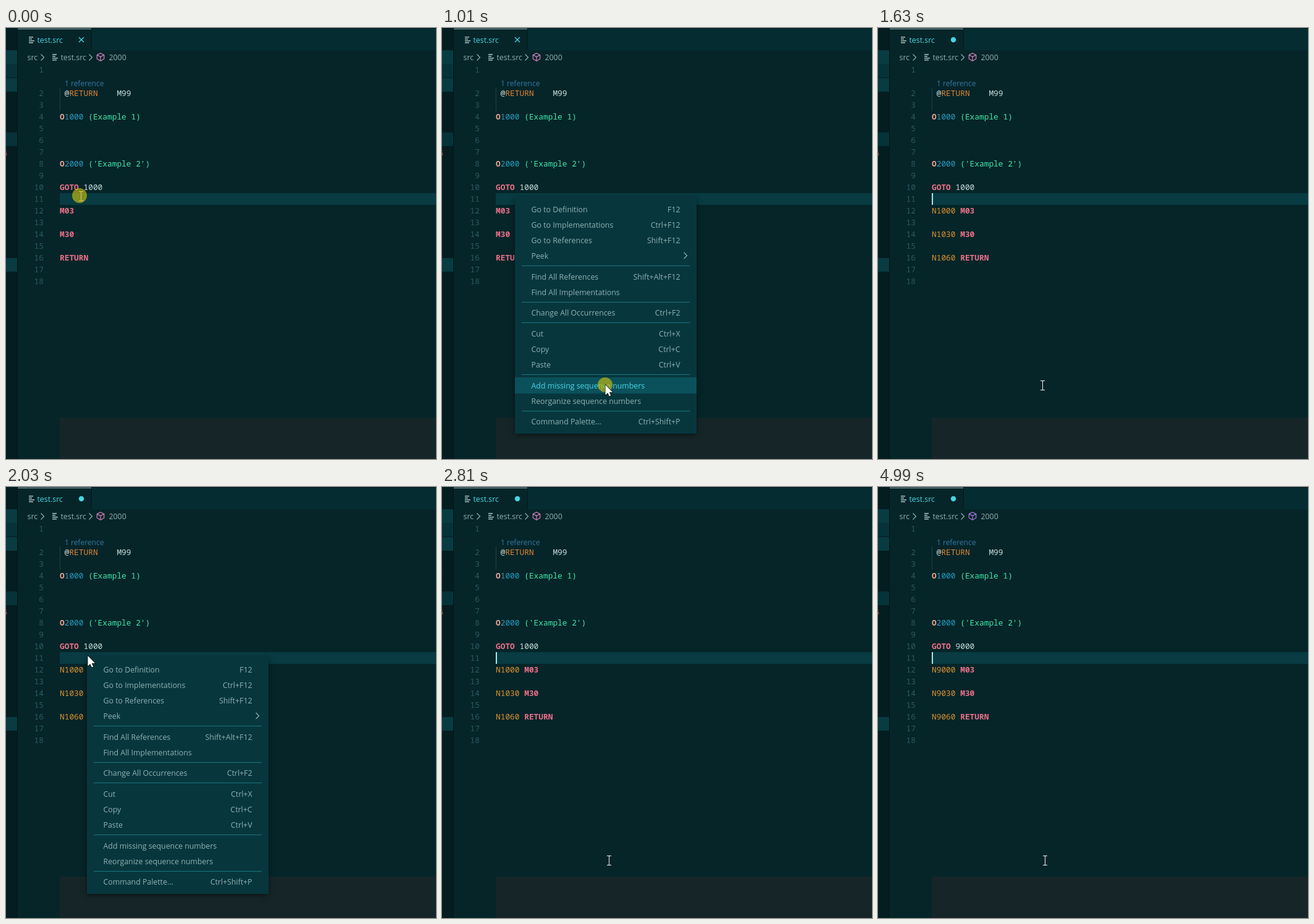
An HTML page with a canvas for the animation above (5460 ms loop, 696 by 697 pixels).

```html
<!DOCTYPE html>
<html lang="en">
<head>
<meta charset="utf-8">
<title>Sequence numbers</title>
<style>
  html, body { margin: 0; width: 100%; height: 100%; overflow: hidden; background: #052529; }
  canvas { display: block; }
</style>
</head>
<body>
<canvas id="stage" width="696" height="697"></canvas>
<script>
const ctx = document.getElementById('stage').getContext('2d');
const LOOP = 5460;
const UI = '12.35px "Open Sans", sans-serif';
const LENS = '12px "Open Sans", sans-serif';
const MONO = '12.83px "Noto Sans Mono", monospace';
const BOLD = 'bold ' + MONO;
const CHAR = 7.7;

const C = {
  editor: '#052529', bar: '#052d31', side: '#041d21', active: '#083b42', dim: '#06323a',
  menu: '#07373d', hover: '#0b515b', rule: '#1c7480', accent: '#45d6e4', muted: '#8fb0b3',
  gutter: '#2c5a61', light: '#c9dedb', pink: '#ec7088', orange: '#dd9230',
  salmon: '#eda592', blue: '#2c9cc0', green: '#40e8a8'
};

// Pointer moves run in discrete steps: start time, step count, step length, goal.
const START = [119, 271];
const MOVES = [
  { at: 393, steps: 8, dt: 77, to: [264, 577] },
  { at: 1630, steps: 4, dt: 80, to: [132, 273] },
  { at: 2190, steps: 2, dt: 80, to: [258, 544] },
  { at: 2350, steps: 2, dt: 80, to: [268, 603] }
];
const CLICKS = [[0, 230], [1010, 1160], [1950, 2030], [2590, 2750]];
const MENUS = [
  { from: 150, to: 1100, x: 118, y: 293 },
  { from: 2030, to: 2810, x: 131, y: 295 }
];
const HINT = " (Press 'Enter' to confirm or 'Escape' to cancel)";
const PROMPTS = [
  { from: 1160, to: 1630, label: 'Sequence number increment', value: '30' },
  { from: 2900, to: 4290, label: 'Start sequence number', value: '1000',
    typed: '9000', keys: [3190, 3360, 3500, 3740] },
  { from: 4290, to: 4910, label: 'Sequence number increment', value: '30' }
];
const CARETS = [[1630, 2030], [2810, 2900], [4910, LOOP]];

const MENU_GROUPS = [
  [['Go to Definition', 'F12'], ['Go to Implementations', 'Ctrl+F12'],
   ['Go to References', 'Shift+F12'], ['Peek', '>']],
  [['Find All References', 'Shift+Alt+F12'], ['Find All Implementations', '']],
  [['Change All Occurrences', 'Ctrl+F2']],
  [['Cut', 'Ctrl+X'], ['Copy', 'Ctrl+C'], ['Paste', 'Ctrl+V']],
  [['Add missing sequence numbers', ''], ['Reorganize sequence numbers', '']],
  [['Command Palette...', 'Ctrl+Shift+P']]
];

const within = (t, [from, to]) => t >= from && t < to;
const current = (list, t) => list.find(item => within(t, [item.from, item.to]));

function rect(color, x, y, w, h) {
  ctx.fillStyle = color;
  ctx.fillRect(x, y, w, h);
}

function text(str, x, middle, color, font = UI, align = 'left') {
  ctx.font = font;
  ctx.textAlign = align;
  ctx.fillStyle = color;
  ctx.fillText(str, x, middle + 4.5);
}

function line(points, color, width = 1.2, closed = false) {
  ctx.beginPath();
  points.forEach(([x, y]) => ctx.lineTo(x, y));
  if (closed) ctx.closePath();
  ctx.strokeStyle = color;
  ctx.lineWidth = width;
  ctx.stroke();
}

function disc(x, y, r, color) {
  ctx.beginPath();
  ctx.arc(x, y, r, 0, 2 * Math.PI);
  ctx.fillStyle = color;
  ctx.fill();
}

function shadowed(draw) {
  ctx.save();
  ctx.shadowColor = 'rgba(0,0,0,.5)';
  ctx.shadowBlur = 8;
  ctx.shadowOffsetY = 2;
  draw();
  ctx.restore();
}

const chevron = (x, y, color) => line([[x - 2.5, y - 5], [x + 2.5, y], [x - 2.5, y + 5]], color);

function fileIcon(x, y) {
  [7, 5, 9, 7].forEach((w, i) => rect('#a9c3c5', x, y - 5 + i * 3, w, 1.5));
}

function cube(x, y, color) {
  line([[x, y - 6.3], [x + 5.7, y - 3.4], [x + 5.7, y + 3], [x, y + 6.2],
    [x - 5.7, y + 3], [x - 5.7, y - 3.4]], color, 1.2, true);
  line([[x - 5.7, y - 3.4], [x, y - 0.5], [x + 5.7, y - 3.4]], color);
  line([[x, y - 0.5], [x, y + 6.2]], color);
}

function drawFrame(t) {
  rect(C.editor, 0, 0, 696, 697);
  rect(C.side, 0, 0, 18, 697);
  rect('#031719', 18, 0, 1, 697);
  [[36, C.active], [58, C.dim], [81, C.active], [169, C.dim], [372, C.active]]
    .forEach(([y, color]) => rect(color, 0, y, 18, 22));
  text('6', -5, 202, '#c4503c');
  text('0', -6, 135, '#4a2928');

  rect(C.bar, 138, 1, 558, 35);
  rect('#031a1d', 19, 0, 677, 1);
  rect('#031a1d', 138, 1, 1, 35);
  rect('#8ab9bd', 19, 1, 119, 1);
  fileIcon(37, 19);
  text('test.src', 50.5, 19, C.accent);
  if (t < 1630) {
    line([[118, 15], [126, 23]], C.accent, 1.3);
    line([[126, 15], [118, 23]], C.accent, 1.3);
  } else {
    disc(122, 19, 4.2, C.accent);
  }

  text('src', 34.5, 47, C.muted);
  chevron(59, 47.5, C.muted);
  fileIcon(75, 47);
  text('test.src', 88.5, 47, C.muted);
  chevron(137, 47.5, C.muted);
  cube(153, 47, t < 4910 ? '#d583bd' : '#b07ae2');
  text('2000', 166.5, 47, C.muted);
}

function codeLines(t) {
  const base = t < 1630 ? 0 : t < 4990 ? 1000 : 9000;
  const block = (offset, word) =>
    [...(base ? [['N' + (base + offset) + ' ', C.orange]] : []), [word, C.pink, BOLD]];
  return {
    2: [[' @', '#d5dfdc'], ['RETURN', '#dd8436'], ['    M99', C.light]],
    4: [['O', C.salmon, BOLD], ['1000', C.blue], [' (Example 1)', C.green]],
    8: [['O', C.salmon, BOLD], ['2000', C.blue], [" ('Example 2')", C.green]],
    10: [['GOTO', C.pink, BOLD], [' ' + (base || 1000), C.light]],
    12: block(0, 'M03'),
    14: block(30, 'M30'),
    16: block(60, 'RETURN')
  };
}

function drawCode(t) {
  rect('#162628', 87, 630, 609, 67);
  rect(C.active, 87, 267, 609, 19);
  rect('#1c4146', 87, 96, 1, 38);
  text('1 reference', 95, 89, '#3678a2', LENS);
  const code = codeLines(t);
  for (let n = 1; n <= 18; n++) {
    const y = n === 1 ? 67.5 : 105.5 + 19 * (n - 2);
    text(n, 61, y, C.gutter, MONO, 'right');
    let x = 87;
    for (const [str, color, font = MONO] of code[n] || []) {
      text(str, x, y, color, font);
      x += str.length * CHAR;
    }
  }
  if (CARETS.some(span => within(t, span))) rect('#a5e9ec', 87, 267, 2, 19);
}

function drawMenu({ x, y }, pointerY) {
  shadowed(() => rect(C.menu, x, y - 19.5, 294, 382.5));
  MENU_GROUPS.forEach((group, g) => {
    for (const [label, keys] of group) {
      const hot = Math.abs(pointerY - y) < 12.7;
      const color = hot ? C.accent : C.muted;
      if (hot) rect(C.hover, x, Math.round(y - 13), 294, 26);
      text(label, x + 26.5, y, color);
      if (keys === '>') chevron(x + 276, y - 1, color);
      else text(keys, x + 267.5, y, color, UI, 'right');
      y += 25.33;
    }
    if (g < MENU_GROUPS.length - 1) rect(C.rule, x + 11, Math.round(y - 10), 272, 1);
    y += 8;
  });
}

function drawPrompt(prompt, t) {
  const { label, value, typed, keys = [] } = prompt;
  const count = keys.filter(at => at <= t).length;
  const shown = count ? typed.slice(0, count) : value;
  shadowed(() => rect('#07383f', 19, 1, 600, 61));
  rect(C.editor, 26, 9, 586, 24);
  ctx.font = UI;
  const end = 29.5 + ctx.measureText(shown).width;
  if (!count) rect('#0f5964', 29.5, 12, end - 29.5, 17);
  text(shown, 29.5, 21, '#d3e4e4');
  rect('#dcebeb', Math.round(end), 13, 1, 16);
  text(label + HINT, 29, 47, '#a5c4c5');
}

function pointerAt(t) {
  let [x, y] = START;
  for (const { at, steps, dt, to } of MOVES) {
    const p = Math.min(Math.max(Math.floor((t - at) / dt), 0), steps) / steps;
    const eased = p * p * (3 - 2 * p);
    x += (to[0] - x) * eased;
    y += (to[1] - y) * eased;
  }
  return [x, y];
}

function drawPointer(x, y, arrow, pressed) {
  if (pressed) disc(x, y, 12, 'rgba(198,190,15,.66)');
  ctx.save();
  ctx.translate(Math.round(x), Math.round(y));
  if (arrow) {
    const shape = [[0.5, 0], [0.5, 16.5], [4.3, 13], [6.8, 18.6], [9.2, 17.5], [6.8, 12], [12, 12]];
    line(shape, '#0a0a0a', 1.4, true);
    ctx.fillStyle = '#fff';
    ctx.fill();
  } else {
    const color = pressed ? '#d9c080' : '#f0f4f4';
    rect(color, 2, -7, 1, 16);
    for (const end of [-7, 8]) {
      rect(color, -1, end, 3, 1);
      rect(color, 3, end, 3, 1);
    }
  }
  ctx.restore();
}

function render(t) {
  const [x, y] = pointerAt(t);
  const menu = current(MENUS, t);
  const prompt = current(PROMPTS, t);
  drawFrame(t);
  drawCode(t);
  if (menu) drawMenu(menu, y);
  if (prompt) drawPrompt(prompt, t);
  drawPointer(x, y, Boolean(menu), CLICKS.some(span => within(t, span)));
}

const began = performance.now();
function tick() {
  render((performance.now() - began) % LOOP);
  requestAnimationFrame(tick);
}
tick();
</script>
</body>
</html>
```
